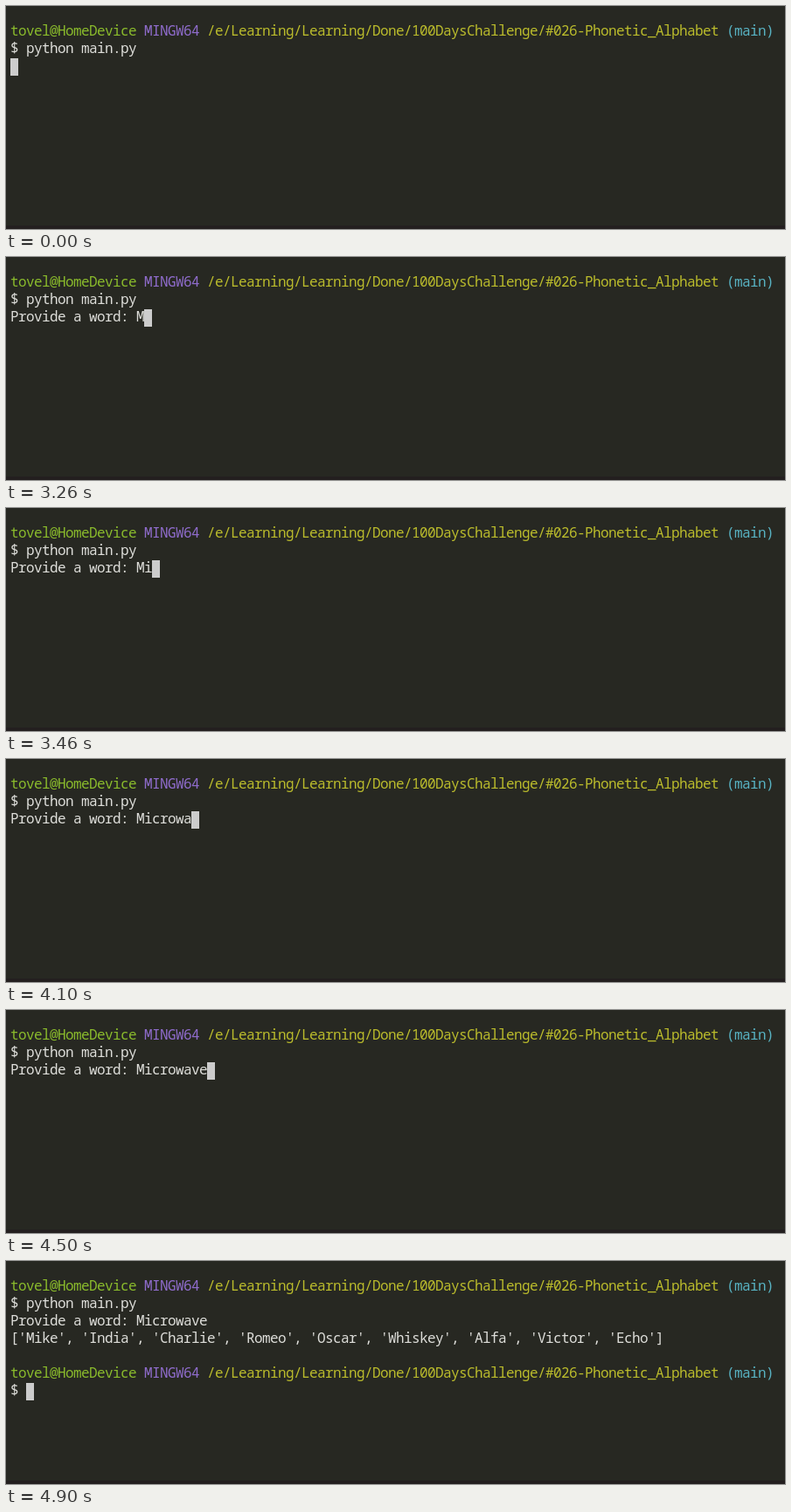
Animation of 891x256 px, one loop 7.13 s. Source, as an HTML page:

```html
<!DOCTYPE html>
<html lang="en">
<head>
<meta charset="utf-8">
<title>Phonetic alphabet in a terminal</title>
<style>
  html, body { margin: 0; width: 100%; height: 100%; overflow: hidden; background: #272822; }
  svg { display: block; width: 891px; height: 256px; }
  text {
    font: 16px "Noto Sans Mono", "DejaVu Sans Mono", monospace;
    letter-spacing: -0.6px;
    fill: #dededa;
    white-space: pre;
  }
  .user { fill: #8abb2c; }
  .system { fill: #8f6ccc; }
  .path { fill: #bbbc2c; }
  .branch { fill: #58b3c3; }
</style>
</head>
<body>
<svg viewBox="0 0 891 256">
  <rect width="891" height="256" fill="#272822"/>
  <rect y="252" width="891" height="4" fill="#231f1f"/>
  <g id="screen"></g>
  <rect id="cursor" width="9" height="20" fill="#cccccc"/>
</svg>
<script>
const LOOP = 7130, LEFT = 5, CELL = 9, ROW = 20, BASELINE = 14;
const WORD = "Microwave";
const ANSWER = "['Mike', 'India', 'Charlie', 'Romeo', 'Oscar', 'Whiskey', 'Alfa', 'Victor', 'Echo']";
const PROMPT = [
  ["user", "tovel@HomeDevice "],
  ["system", "MINGW64 "],
  ["path", "/e/Learning/Learning/Done/100DaysChallenge/#026-Phonetic_Alphabet "],
  ["branch", "(main)"]
];
// Start time and number of letters typed
const TYPING = [[220, 0], [3260, 1], [3460, 2], [3660, 3], [3880, 6], [4100, 7], [4300, 8], [4500, 9]];
const ANSWER_AT = 4700, PROMPT_AT = 4900;

const screen = document.getElementById("screen");
const cursor = document.getElementById("cursor");

function svg(tag, parent, attrs, content = "") {
  const el = document.createElementNS("http://www.w3.org/2000/svg", tag);
  for (const name in attrs) el.setAttribute(name, attrs[name]);
  el.textContent = content;
  return parent.appendChild(el);
}

function addLine(row, content = "") {
  return svg("text", screen, { x: LEFT, y: row * ROW + BASELINE }, content);
}

function addPrompt(row) {
  const line = addLine(row);
  for (const [style, content] of PROMPT) svg("tspan", line, { class: style }, content);
  return line;
}

addPrompt(1);
addLine(2, "$ python main.py");
const input = addLine(3);
const answer = addLine(4, ANSWER);
const nextPrompt = [addPrompt(6), addLine(7, "$ ")];

function show(el, on) {
  el.setAttribute("visibility", on ? "visible" : "hidden");
}

function placeCursor(col, row) {
  cursor.setAttribute("x", LEFT + col * CELL);
  cursor.setAttribute("y", row * ROW);
}

function render(t) {
  const step = TYPING.filter(([start]) => t >= start).pop();
  const typed = step ? "Provide a word: " + WORD.slice(0, step[1]) : "";
  if (input.textContent !== typed) input.textContent = typed;

  const answered = t >= ANSWER_AT, done = t >= PROMPT_AT;
  show(answer, answered);
  nextPrompt.forEach(el => show(el, done));

  if (done) placeCursor(2, 7);
  else if (answered) placeCursor(0, 5);
  else placeCursor(typed.length, 3);
}

const origin = performance.now();
function tick() {
  render((performance.now() - origin) % LOOP);
  requestAnimationFrame(tick);
}
tick();
</script>
</body>
</html>
```
